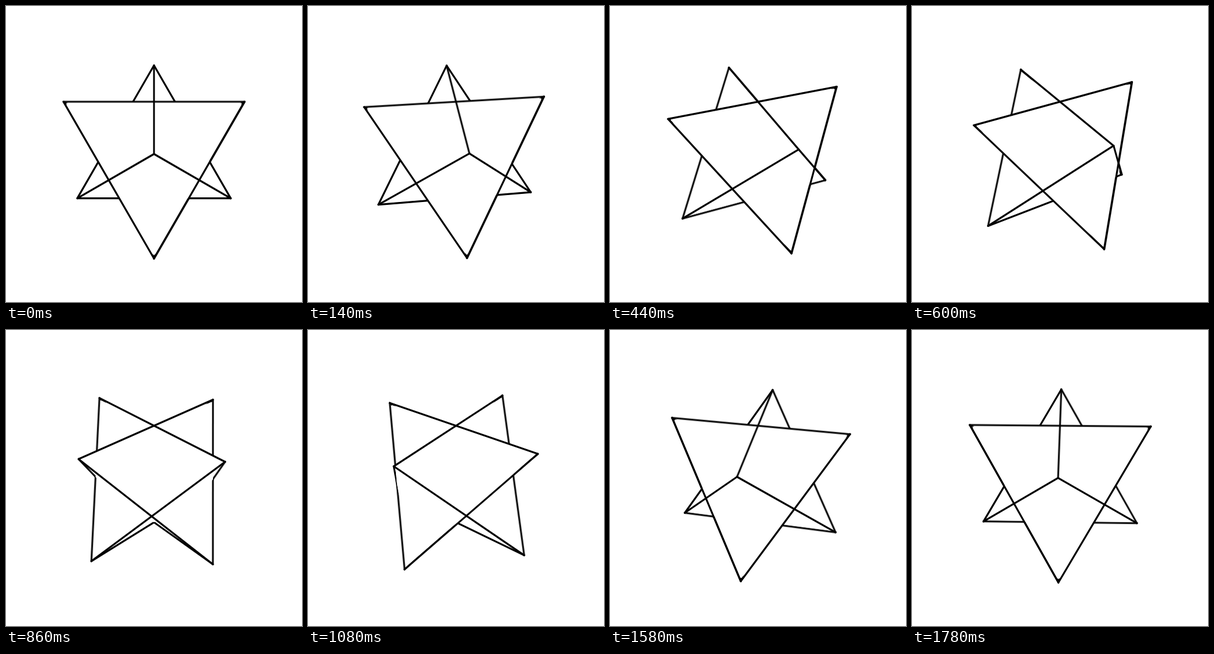
Recreate the animation shown at these times as an HTML page without scripts. Size 512 px wide and 512 px high, loop 1.8 s.

```html
<!DOCTYPE html>
<html lang="en">
<head>
<meta charset="utf-8">
<title>Turning star</title>
<style>
@property --t { syntax: "<angle>"; inherits: true; initial-value: 0deg; }

html, body { margin: 0; width: 100%; height: 100%; overflow: hidden; background: #fff; }

/* Two crossed tetrahedra on the corners of a cube: a0-a3 top ring, b0-b3 bottom ring.
   --wXX is the perspective scale of a corner. */
svg {
  display: block; width: 100vw; height: 100vh; background: #fff;
  animation: spin 1.8s steps(90) -2ms infinite;
  --s: sin(var(--t));
  --c: cos(var(--t));

  --wa0: calc(711px / (6.4226 - 1.1547 * var(--c)));
  --wa1: calc(711px / (6.4226 + 1.1547 * var(--s)));
  --wa2: calc(711px / (6.4226 + 1.1547 * var(--c)));
  --wa3: calc(711px / (6.4226 - 1.1547 * var(--s)));
  --wb0: calc(711px / (7.5774 - 1.1547 * var(--c)));
  --wb1: calc(711px / (7.5774 + 1.1547 * var(--s)));
  --wb2: calc(711px / (7.5774 + 1.1547 * var(--c)));
  --wb3: calc(711px / (7.5774 - 1.1547 * var(--s)));

  --a0x: calc(256px + 1.4142 * var(--s) * var(--wa0));
  --a1x: calc(256px + 1.4142 * var(--c) * var(--wa1));
  --a2x: calc(256px - 1.4142 * var(--s) * var(--wa2));
  --a3x: calc(256px - 1.4142 * var(--c) * var(--wa3));
  --b0x: calc(256px + 1.4142 * var(--s) * var(--wb0));
  --b1x: calc(256px + 1.4142 * var(--c) * var(--wb1));
  --b2x: calc(256px - 1.4142 * var(--s) * var(--wb2));
  --b3x: calc(256px - 1.4142 * var(--c) * var(--wb3));

  --a0y: calc(256px - .8165 * (1 - var(--c)) * var(--wa0));
  --a1y: calc(256px - .8165 * (1 + var(--s)) * var(--wa1));
  --a2y: calc(256px - .8165 * (1 + var(--c)) * var(--wa2));
  --a3y: calc(256px - .8165 * (1 - var(--s)) * var(--wa3));
  --b0y: calc(256px + .8165 * (1 + var(--c)) * var(--wb0));
  --b1y: calc(256px + .8165 * (1 - var(--s)) * var(--wb1));
  --b2y: calc(256px + .8165 * (1 - var(--c)) * var(--wb2));
  --b3y: calc(256px + .8165 * (1 + var(--s)) * var(--wb3));

  --a0: var(--a0x) var(--a0y);
  --a1: var(--a1x) var(--a1y);
  --a2: var(--a2x) var(--a2y);
  --a3: var(--a3x) var(--a3y);
  --b0: var(--b0x) var(--b0y);
  --b1: var(--b1x) var(--b1y);
  --b2: var(--b2x) var(--b2y);
  --b3: var(--b3x) var(--b3y);
}
@keyframes spin { from { --t: 0deg; } to { --t: 90deg; } }

/* Edge from (x, y) to (u, v) */
.edge {
  --dx: calc(var(--u) - var(--x));
  --dy: calc(var(--v) - var(--y));
  x: -1.6px; y: -1.6px; rx: 1.6px; height: 3.2px;
  width: calc(hypot(var(--dx), var(--dy)) + 3.2px);
  transform: translate(var(--x), var(--y)) rotate(atan2(var(--dy), var(--dx)));
}
.a0 { --x: var(--a0x); --y: var(--a0y); }
.a1 { --x: var(--a1x); --y: var(--a1y); }
.a2 { --x: var(--a2x); --y: var(--a2y); }
.a3 { --x: var(--a3x); --y: var(--a3y); }
.b0 { --x: var(--b0x); --y: var(--b0y); }
.b1 { --x: var(--b1x); --y: var(--b1y); }
.to-a2 { --u: var(--a2x); --v: var(--a2y); }
.to-a3 { --u: var(--a3x); --v: var(--a3y); }
.to-b0 { --u: var(--b0x); --v: var(--b0y); }
.to-b1 { --u: var(--b1x); --v: var(--b1y); }
.to-b2 { --u: var(--b2x); --v: var(--b2y); }
.to-b3 { --u: var(--b3x); --v: var(--b3y); }

/* White faces hide the edges behind them */
.face { width: 512px; height: 512px; fill: #fff; }
.p1 { clip-path: polygon(var(--a1), var(--a3), var(--b0)); }
.p2 { clip-path: polygon(var(--a1), var(--a3), var(--b2)); }
.p3 { clip-path: polygon(var(--a1), var(--b0), var(--b2)); }
.p4 { clip-path: polygon(var(--a3), var(--b0), var(--b2)); }
.q1 { clip-path: polygon(var(--a0), var(--a2), var(--b1)); }
.q2 { clip-path: polygon(var(--a0), var(--a2), var(--b3)); }
.q3 { clip-path: polygon(var(--a0), var(--b1), var(--b3)); }
.q4 { clip-path: polygon(var(--a2), var(--b1), var(--b3)); }

.back { mix-blend-mode: multiply; }
/* Slightly smaller, so the outline keeps its full weight */
.inset { transform-origin: 256px 256px; transform: scale(.97); }

/* Side edges come to the front only while their side faces the viewer */
.right { animation: right 1.8s step-end -2ms infinite; }
.left { animation: left 1.8s step-end -2ms infinite; }
@keyframes right { 0% { visibility: visible; } 38.8%, 100% { visibility: hidden; } }
@keyframes left { 0% { visibility: hidden; } 61.2%, 100% { visibility: visible; } }
</style>
</head>
<body>
<svg viewBox="0 0 512 512">
  <g class="back">
    <rect class="edge a1 to-b0"/>
    <rect class="edge a3 to-b2"/>
    <rect class="edge a1 to-b2"/>
    <rect class="edge b0 to-b2"/>
    <g class="inset">
      <rect class="face p1"/><rect class="face p2"/><rect class="face p3"/><rect class="face p4"/>
    </g>
    <rect class="face q1"/><rect class="face q2"/><rect class="face q3"/><rect class="face q4"/>
  </g>
  <g class="back">
    <rect class="edge a0 to-b1"/>
    <rect class="edge a2 to-b3"/>
    <rect class="edge a2 to-b1"/>
    <rect class="edge b1 to-b3"/>
    <g class="inset">
      <rect class="face q1"/><rect class="face q2"/><rect class="face q3"/><rect class="face q4"/>
    </g>
    <rect class="face p1"/><rect class="face p2"/><rect class="face p3"/><rect class="face p4"/>
  </g>
  <g>
    <rect class="edge a0 to-a2"/>
    <rect class="edge a1 to-a3"/>
    <rect class="edge a3 to-b0"/>
    <rect class="edge a0 to-b3"/>
  </g>
  <g class="right">
    <rect class="edge a0 to-b1"/>
    <rect class="edge a1 to-b0"/>
  </g>
  <g class="left">
    <rect class="edge a2 to-b3"/>
    <rect class="edge a3 to-b2"/>
  </g>
</svg>
</body>
</html>
```
